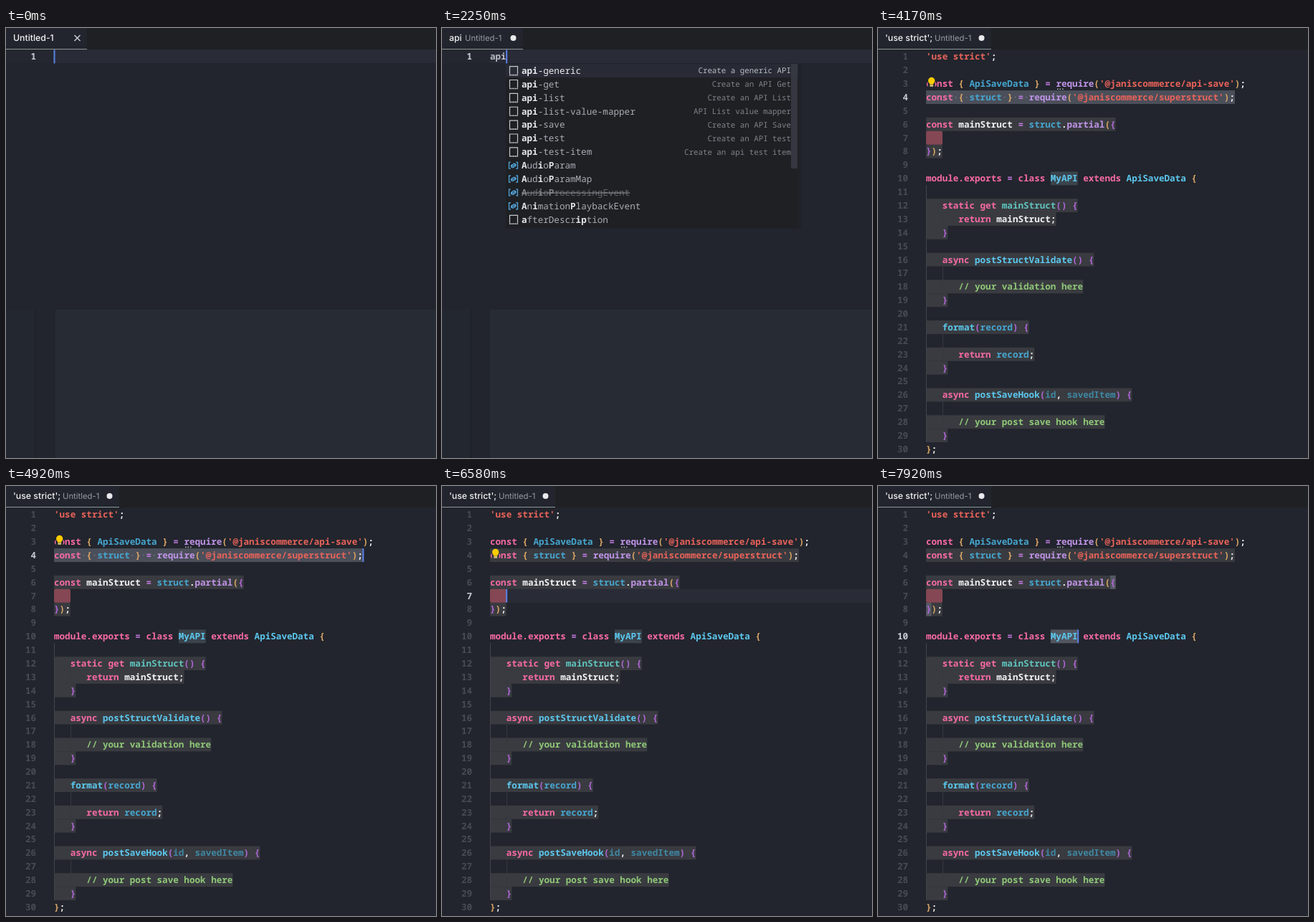
An HTML page for the animation above (8000 ms loop, 600x600 px).

```html
<!DOCTYPE html>
<html lang="en">
<head>
<meta charset="utf-8">
<title>Editor snippet</title>
<style>
html, body { margin: 0; width: 100%; height: 100%; overflow: hidden; background: #22252d; }
svg { display: block; width: 100vw; height: 100vh; }
text { white-space: pre; text-rendering: geometricPrecision; font-variant-ligatures: none; }
.code { font: 600 12.6px "Noto Sans Mono", "DejaVu Sans Mono", monospace; }
.item { font: 500 12.6px "Noto Sans Mono", "DejaVu Sans Mono", monospace; }
.item .hit { font-weight: 700; fill: #e4e6ea; }
.note { font: 500 10.8px "Noto Sans Mono", "DejaVu Sans Mono", monospace; }
.tab { font: 500 12.3px Inter, sans-serif; }
.path { font: 400 11.3px Inter, sans-serif; }
</style>
</head>
<body>
<svg id="stage" viewBox="0 0 600 600"></svg>
<script>
const LOOP = 8000, LEFT = 67, CHAR = 7.56, STEP = 18.88, BLINK = 250;
const stage = document.getElementById('stage');

// Each piece of a line starts with its colour key; pieces are split by ~.
const inks = {
  k: '#f76aa4', w: '#f1f2f4', r: '#e9635a', c: '#5cc8ee', b: '#46a6d0', d: '#3f87a3',
  g: '#d9a566', u: '#b267d8', f: '#c094e8', o: '#c77ee6', n: '#8fc877', t: '#5fc4bd'
};
const lines = [
  "r'use strict'~w;",
  "",
  "kconst ~g{ ~bApiSaveData ~g} ~o= ~frequire~g(~r'@janiscommerce/api-save'~g)~w;",
  "kconst ~g{ ~bstruct ~g} ~o= ~frequire~g(~r'@janiscommerce/superstruct'~g)~w;",
  "",
  "kconst ~wmainStruct ~o= ~bstruct~w.~fpartial~g(~u{",
  "",
  "u}~g)~w;",
  "",
  "kmodule.exports ~o= ~kclass ~cMyAPI ~kextends ~cApiSaveData ~g{",
  "",
  "k   static get ~tmainStruct~u() {",
  "k      return ~wmainStruct;",
  "u   }",
  "",
  "k   async ~cpostStructValidate~u() {",
  "",
  "n      // your validation here",
  "u   }",
  "",
  "c   format~u(~brecord~u) {",
  "",
  "k      return ~brecord~w;",
  "u   }",
  "",
  "k   async ~cpostSaveHook~u(~did~w, ~dsavedItem~u) {",
  "",
  "n      // your post save hook here",
  "u   }",
  "g}~w;"
].map(s => s ? s.split('~').map(p => [inks[p[0]], p.slice(1)]) : []);
const plain = lines.map(l => l.map(p => p[1]).join(''));
const shaded = [4, 6, 8, 12, 13, 14, 16, 18, 19, 21, 23, 24, 26, 28, 29];

// Square brackets mark the matched letters.
const items = [
  ['[api]-generic', 'Create a generic API'],
  ['[api]-get', 'Create an API Get'],
  ['[api]-list', 'Create an API List'],
  ['[api]-list-value-mapper', 'API List value mapper'],
  ['[api]-save', 'Create an API Save'],
  ['[api]-test', 'Create an API test'],
  ['[api]-test-item', 'Create an api test item'],
  ['[A]ud[i]o[P]aram'],
  ['[A]ud[i]o[P]aramMap'],
  ['[A]ud[i]o[P]rocessingEvent', '', true],
  ['[A]n[i]mation[P]laybackEvent'],
  ['[a]fterDescr[ip]tion']
];

const keys = [1580, 2000, 2170];
const popupAt = 1920, arrows = [2830, 3000, 3170, 3340];
const stops = [3900, 5480, 6420, 7250];
const idle = [80, 330, 580, 920, 1170, 1420];

const colX = c => LEFT + c * CHAR;
const lineTop = n => 30.5 + (n - 1) * STEP;
const baseline = n => lineTop(n) + 13.8;
const passed = (list, t) => list.filter(x => t >= x).length;
const blink = (t, from) => Math.floor((t - from) / BLINK) % 2 === 0;

const rect = (x, y, w, h, fill, extra = '') =>
  `<rect x="${x}" y="${y}" width="${w}" height="${h}" fill="${fill}" ${extra}/>`;
const text = (x, y, cls, fill, body, extra = '') =>
  `<text x="${x}" y="${y}" class="${cls}" fill="${fill}" ${extra}>${body}</text>`;
const band = (n, from, to, fill) =>
  rect(colX(from), lineTop(n), (to - from) * CHAR, STEP, fill);
const caret = (n, c) => rect(colX(c) - .5, lineTop(n), 2, STEP, '#5a82e6');
const lineNo = (n, on) =>
  text(42, baseline(n), 'code', on ? '#c6cad2' : '#474b54', n, 'text-anchor="end"');

function tabBar(typed, width, pathX) {
  const dotX = width - 13.5;
  let s = rect(0, 0, 600, 30, '#1f2023') + rect(0, 0, width, 30, '#22252d') +
    rect(0, 29, width, 1, '#8d9697');
  if (typed) {
    s += text(10, 18.3, 'tab', '#f2f3f5', typed) +
      text(pathX, 18.3, 'path', '#969aa2', 'Untitled-1') +
      `<circle cx="${dotX}" cy="14" r="4" fill="#e8eaed"/>`;
  } else {
    s += text(10, 18.3, 'tab', '#f2f3f5', 'Untitled-1') +
      `<path d="M95.5 10l8 8m0-8l-8 8" stroke="#d8dbe0" stroke-width="1.2"/>`;
  }
  return s;
}

function icon(y, field) {
  if (field) {
    return `<g fill="none" stroke="#58aee6" stroke-width="1.2">
      <path d="M96 ${y - 4.5}h-2.5v9h2.5M103 ${y - 4.5}h2.5v9h-2.5"/>
      <path d="M96.5 ${y}l4-2.5 2.5 1v2l-4 2.5-2.5-1zl2.5 1 4-2.5"/></g>`;
  }
  return `<g fill="none" stroke="#c3c6cb" stroke-width="1.2">
    <path d="M94.5 ${y + 5}v-11h11v11"/>
    <path d="M94 ${y + 6}h12" stroke-width="1.6" stroke-dasharray="2 .6"/></g>`;
}

function popup(selected, barAlpha) {
  let s = rect(89, 50, 413, 230, '#1f2228') + rect(89, 50, 408, 229, '#1e2024');
  items.forEach(([label, note, old], i) => {
    const y = 59.6 + i * STEP, on = i === selected;
    if (on) s += rect(89, y - 9.4, 408, STEP, '#282b35');
    const body = label.replace(/\[/g, '<tspan class="hit">').replace(/\]/g, '</tspan>');
    s += icon(y, i > 6 && i < 11);
    s += text(111, y + 4.3, 'item', on ? '#eceef1' : '#a9adb4', body, old ? 'opacity=".5"' : '');
    if (old) s += rect(111, y, 20 * CHAR, 1.2, '#85898f');
    if (note) s += text(487, y + 3.8, 'note', on ? '#b9bdc4' : '#7f838a', note, 'text-anchor="end"');
  });
  return s + rect(487, 50, 9, 146, '#353841', `opacity="${barAlpha}"`);
}

function emptyView(t) {
  const count = passed(keys, t), typed = 'api'.slice(0, count);
  const from = t >= 3420 ? 3420 : keys[count - 1];
  const on = count ? blink(t, from) : passed(idle, t) % 2 === 0;
  let s = rect(0, 393, 41, 207, '#23272f') + rect(40, 393, 1.5, 207, '#1d2027') +
    rect(count ? 67 : 69, 393, 533, 207, '#272c34') +
    tabBar(typed, 113, [0, 22, 29, 32][count]) +
    rect(0, 30, 67, 19, '#242730') + rect(67, 30, 533, 19, '#292b37') +
    lineNo(1, true) + text(LEFT, baseline(1), 'code', '#b9bdc5', typed);
  if (t >= popupAt) {
    const alpha = Math.max(0, Math.min(1, (3400 - t) / 700));
    s += popup(passed(arrows, t), alpha.toFixed(2));
  }
  return s + (on ? caret(1, count) : '');
}

function bulb(n) {
  const y = lineTop(n) + 9;
  return rect(69.5, y - 9, 10, 17, n === 3 ? '#22252d' : '#393b41') +
    `<path d="M72.3 ${y + 1.5}c0-2-2.3-2.6-2.3-5.3a4.7 4.7 0 0 1 9.4 0c0 2.700-2.300 3.300-2.300 5.300z" fill="#fc0"/>` +
    rect(72.3, y + 2, 4.8, 2.5, '#d8c67a');
}

const spaces = n => [...plain[n - 1]].map((ch, c) => ch === ' ' ?
  `<circle cx="${colX(c + .5)}" cy="${lineTop(n) + 9.5}" r=".8" fill="#7b7f88"/>` : '').join('');

function codeView(t) {
  const stop = passed(stops, t) - 1, age = t - stops[stop];
  const active = [4, 8, 7, 10][stop];
  const sel = '#4b4f5a';
  let s = tabBar("'use strict';", 158, 79);
  if (stop === 2) s += rect(67, lineTop(7), 533, STEP, '#292b37');
  for (const n of shaded) s += band(n, 0, plain[n - 1].length, '#393b40');
  s += band(10, 23, 28, stop === 3 ? '#515661' : '#3b444d');
  if (stop === 0) s += band(4, 0, 57, sel) + spaces(4);
  if (stop === 1) {
    s += band(5, 0, 1, sel) + band(6, 0, 36, sel) + band(7, 0, 4, sel) +
      band(8, 0, 3, sel) + spaces(6);
  }
  if (stop === 3) s += band(6, 34, 35, '#555862') + band(8, 0, 1, '#555862');
  s += rect(67, lineTop(7), 23, STEP, '#854754', 'rx="2"');
  if (stop === 1) s += text(69, baseline(7), 'code', '#a76874', '→');
  s += rect(67, lineTop(11), 1, 19 * STEP, '#41444b');
  for (const [n, h] of [[13, 1], [17, 2], [22, 2], [27, 2]])
    s += rect(90, lineTop(n), 1, h * STEP, '#36393f');
  lines.forEach((parts, i) => {
    s += lineNo(i + 1, i + 1 === active);
    if (parts.length) {
      s += text(LEFT, baseline(i + 1), 'code', '#fff',
        parts.map(([ink, str]) => `<tspan fill="${ink}">${str}</tspan>`).join(''));
    }
  });
  for (let i = 0; i < 3; i++) s += rect(250 + i * 3.5, 84.5, 1.6, 1.6, '#a9adb4');
  if (stop === 0 && age > 250) s += bulb(3);
  if (stop === 1 && age > 250 || stop === 2 && age < 250) s += bulb(4);
  if (blink(t, stops[stop])) s += caret(active, [57, 3, 3, 28][stop]);
  return s;
}

let last = '';
function draw(now) {
  const t = now % LOOP;
  const view = rect(0, 0, 600, 600, '#22252d') + (t < stops[0] ? emptyView(t) : codeView(t));
  if (view !== last) stage.innerHTML = last = view;
}

const start = performance.now();
function frame() {
  draw(performance.now() - start);
  requestAnimationFrame(frame);
}
frame();
</script>
</body>
</html>
```
